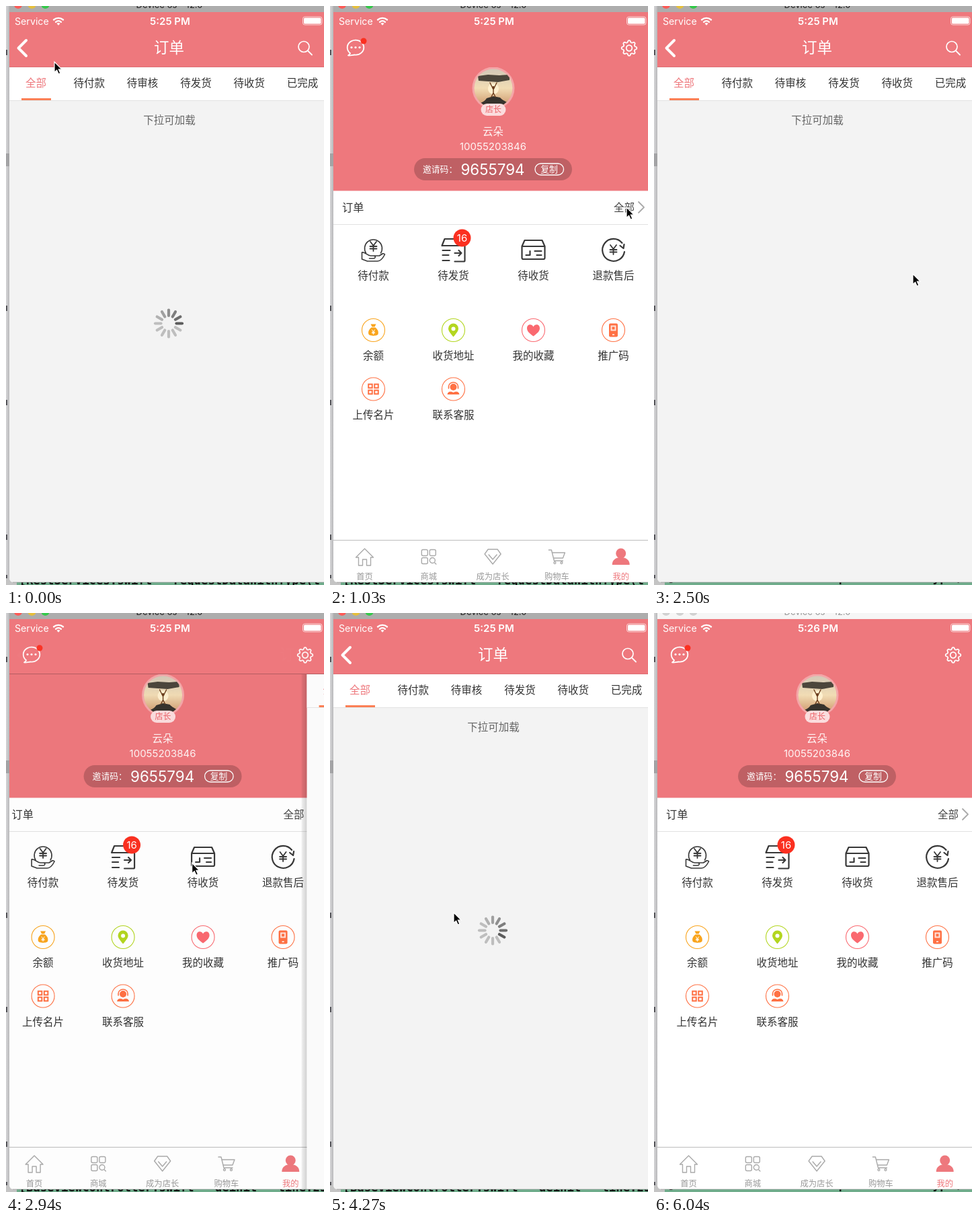
Recreate the animation shown at these times as an HTML page. Size 473 by 860 pixels, loop 6140 ms.

```html
<!DOCTYPE html>
<html lang="zh-CN">
<head>
<meta charset="utf-8">
<title>订单</title>
<style>
html, body { margin: 0; width: 100%; height: 100%; overflow: hidden; background: #d0d0d0; }
svg { display: block; width: 473px; height: 860px; }
text { font-family: Inter, "Noto Sans CJK SC", "Noto Sans CJK", sans-serif; }
.log { font: bold 17.3px "DejaVu Sans Mono", monospace; white-space: pre; }
.line { fill: none; stroke-linecap: round; stroke-linejoin: round; }
</style>
</head>
<body>
<svg id="stage" viewBox="0 0 473 860"></svg>
<script>
const LOOP = 6140, RED = '#ee787d', INK = '#383838', ORANGE = '#ff7144';

// ---------- drawing helpers ----------
const text = (x, mid, size, str, fill = '#333', anchor = 'middle', extra = '') =>
  `<text x="${x}" y="${mid + size * 0.37}" font-size="${size}" fill="${fill}" text-anchor="${anchor}" ${extra}>${str}</text>`;
const rect = (x, y, w, h, fill, extra = '') =>
  `<rect x="${x}" y="${y}" width="${w}" height="${h}" fill="${fill}" ${extra}/>`;
const disc = (x, y, r, fill, extra = '') =>
  `<circle cx="${x}" cy="${y}" r="${r}" fill="${fill}" ${extra}/>`;
const ring = (x, y, r, color, w) => disc(x, y, r, 'none', `stroke="${color}" stroke-width="${w}"`);
const line = (d, color, w) => `<path class="line" d="${d}" stroke="${color}" stroke-width="${w}"/>`;
const shape = (d, fill) => `<path d="${d}" fill="${fill}"/>`;
const at = (x, y, body) => `<g transform="translate(${x} ${y})">${body}</g>`;
const group = (id, body) => `<g id="${id}">${body}</g>`;

const cols = [64.5, 183.5, 302.5, 421.5];
const yen = line('M-4.5 -7L0 -1L4.5 -7M0 -1V7M-5 0H5M-5 3.5H5', INK, 1.8);

// ---------- home icons, centred on 0,0 ----------
const orderIcons = [
  at(0, -5, yen) +
    line('M-11 5A13 13 0 1 1 11 5M-17 4V14L-9 17H6C11 17 15 11 17 7C15 4 12 7 9 9H0M-17 4C-12 3 -9 9 -4 9H1C4 10 3 13 0 13H-6', INK, 1.6),
  line('M-17 -6L-13 -16H12L17 -6V16A1.5 1.5 0 0 1 15.5 17.5H2M-17 -6H17M-16 1H-5M-16 8H-7M-16 16H-6M2 5H12M8 1L12 5L8 9', INK, 2.2),
  line('M-17 -5L-13 -14H13L17 -5V12A2 2 0 0 1 15 14H-15A2 2 0 0 1 -17 12ZM-17 -5H17M-11 8H-5V2M2 2H12M5 8H12', INK, 2.2),
  yen + line('M13 -10A16.5 16.5 0 1 0 16.5 3M16 -8L15 -2L10 -6', INK, 2.2)
];
const squares = (a, s) => [-a, a].map(x => [-a, a].map(y =>
  rect(x - s / 2, y - s / 2, s, s, 'none', `stroke="${ORANGE}" stroke-width="2"`)).join('')).join('');
const toolIcons = [
  ['#f9a41c', '余额', shape('M-4 -9H4L2 -5H-2ZM-3 -4H3C7 -1 8 3 7 6C6 9 -6 9 -7 6C-8 3 -7 -1 -3 -4Z', '#f9a41c') +
    at(0, 3, `<g transform="scale(.5)">${line('M-4 -7L0 -1L4 -7M0 -1V6M-4 0H4M-4 3H4', '#fff', 2)}</g>`)],
  ['#b3d61f', '收货地址', shape('M0 10C-5 4 -7.5 1 -7.5 -2.5A7.5 7.5 0 0 1 7.5 -2.5C7.5 1 5 4 0 10Z', '#b3d61f') + disc(0, -2, 3, '#fff')],
  ['#fa6970', '我的收藏', shape('M0 9C-7 4 -9.5 1 -9.5 -3C-9.5 -9 -2.5 -10 0 -5C2.5 -10 9.5 -9 9.5 -3C9.5 1 7 4 0 9Z', '#fa6970')],
  [ORANGE, '推广码', rect(-6.5, -10, 13, 20, ORANGE, 'rx="2"') + rect(-4, -7, 8, 8, '#ffe3da') +
    rect(-2, -5, 4, 4, ORANGE) + rect(-1.5, 6, 3, 1.5, '#fff')],
  [ORANGE, '上传名片', squares(4.5, 5.5)],
  [ORANGE, '联系客服', disc(0, -3, 5, ORANGE) + shape('M-9 8C-8 3 -4 3 0 5C4 3 8 3 9 8Z', ORANGE) +
    line('M-7 -1V-4A7 6 0 0 1 7 -4V-1', ORANGE, 1.6)]
];
const tabIcons = [
  ['首页', line('M-13 1L0 -12L13 1H9V13H3V4H-3V13H-9V1Z', '#aaa', 1.4)],
  ['商城', [[-6, -6], [6, -6], [-6, 6]].map(([x, y]) =>
    rect(x - 4.5, y - 4.5, 9, 9, 'none', 'rx="2" stroke="#aaa" stroke-width="1.4"')).join('') +
    ring(5.5, 5.5, 4, '#aaa', 1.4) + line('M9 9L11 11', '#aaa', 1.4)],
  ['成为店长', line('M-7 -11H7L12 -4L0 11L-12 -4ZM-6 -3L0 4L6 -3', '#aaa', 1.4)],
  ['购物车', line('M-12 -10H-8L-4 6H9M-7 -6H12L9 2H-5', '#aaa', 1.4) + ring(-3, 9, 1.5, '#aaa', 1.3) + ring(7, 9, 1.5, '#aaa', 1.3)],
  ['我的', disc(0, -5, 7.5, RED) + shape('M-13 12C-13 4 -7 2 -3 1H3C7 2 13 4 13 12Z', RED)]
];

const avatar = disc(243, 122, 31.5, '#f4a6a8') + `<g clip-path="url(#round)">` +
  rect(214, 92, 58, 60, 'url(#dusk)') + disc(243, 123, 8, '#fff0cf') +
  shape('M220 104L235 102L252 103L267 102V110L250 113L221 111Z', '#4c463b') +
  shape('M214 152C222 142 228 145 233 137L243 134L253 136C258 142 264 141 272 152Z', '#37332d') +
  disc(243, 121, 2, '#6b3d1c') + line('M238 114L243 124L248 114M243 124V129L240 135M243 129L246 135', '#6b3d1c', 1.4) + '</g>';

const home = rect(5, 9, 480, 850, '#fff') + rect(5, 9, 480, 265.5, RED) + avatar +
  rect(224.5, 145, 37, 18, '#fbdcdd', 'rx="9"') + text(243, 154, 12, '店长', '#ec6268') +
  text(242.5, 186.5, 15.5, '云朵', '#fff4f4') +
  text(242.5, 208.5, 15, '10055203846', '#fff4f4') +
  rect(125, 226, 235, 33, '#bf6064', 'rx="16.5"') +
  text(138, 242.5, 12.8, '邀请码：', '#fff', 'start') +
  text(242, 243, 22.4, '9655794', '#fff') +
  rect(305, 234, 42.5, 17, 'none', 'rx="8.5" stroke="#fff" stroke-width="1.3"') + text(326, 242.5, 12.8, '复制', '#fff') +
  text(18, 299, 16.2, '订单', '#333', 'start') + text(422, 299, 15.5, '全部', '#444', 'start') +
  line('M459 291L467 299L459 307', '#aaa', 1.8) + rect(5, 324, 480, 1, '#e2e2e2') +
  ['待付款', '待发货', '待收货', '退款售后'].map((s, i) =>
    at(cols[i], 362, orderIcons[i]) + text(cols[i], 400, 15.5, s)).join('') +
  disc(196.5, 344.5, 13, '#fb3020') + text(196.5, 344.5, 15, '16', '#fff') +
  toolIcons.map(([c, s, body], i) => {
    const x = cols[i % 4], y = i < 4 ? 481.5 : 569;
    return ring(x, y, 17, c, 1.1) + at(x, y, body) + text(x, y + 38, 15.5, s);
  }).join('') +
  rect(5, 793, 480, 1, '#bcbcbc') +
  tabIcons.map(([s, body], i) => {
    const x = 51.5 + i * 95.3;
    return at(x, 818, body) + text(x, 847, 12.3, s, i === 4 ? RED : '#999');
  }).join('');

// ---------- order list page ----------
const spokes = Array.from({ length: 12 }, (_, i) =>
  `<line class="spoke" y1="-20" y2="-11.5" stroke-width="4.2" stroke-linecap="round" transform="rotate(${i * 30})"/>`).join('');
const page = rect(-3, 91, 8, 770, 'url(#shade)', 'id="edge"') + rect(5, 91, 480, 770, '#f3f3f3', 'id="paper"') +
  group('pull', text(243, 169.5, 15.5, '下拉可加载', '#666')) +
  rect(5, 91, 480, 49, '#fff', 'id="tabs"') + rect(5, 140, 480, 1, '#e3e3e3') +
  ['全部', '待付款', '待审核', '待发货', '待收货', '已完成'].map((s, i) =>
    text(44.5 + i * 79.3, 114.5, 15.5, s, i ? '#333' : RED)).join('') +
  rect(23, 137, 44, 3, '#fb7f55') +
  `<g id="spin" transform="translate(242 471.5)">${spokes}</g>`;

// ---------- navigation and status bars ----------
const gear = Array.from({ length: 65 }, (_, i) => {
  const a = i / 64 * 2 * Math.PI, r = 10 + 1.3 * Math.tanh(3 * Math.cos(8 * a));
  return (i ? 'L' : 'M') + (r * Math.cos(a)).toFixed(2) + ' ' + (r * Math.sin(a)).toFixed(2);
}).join('') + 'Z';
const homeNav = line('M30 70A12.3 11 0 1 1 36 72.5C33 73 29 74 27 73.5C29 72 30 71 30 70Z', '#fff', 1.8) +
  [32, 38, 44].map(x => disc(x, 61.5, 1.6, '#fff')).join('') + disc(50, 52, 4.5, '#fb3020') +
  at(445, 62.5, line(gear, '#fff', 1.7) + ring(0, 0, 4.3, '#fff', 1.7));
const pageNav = line('M30 51L18.5 62.5L30 74', '#fff', 4) +
  group('head', text(242.5, 62, 22.5, '订单', '#fff')) +
  ring(443, 60.5, 8, '#fff', 1.7) + line('M449 66.5L455 72.5', '#fff', 1.8);
const status = text(13, 22.5, 14.2, 'Service', '#fff', 'start') +
  line('M71 20.5A10.5 10.5 0 0 1 85 20.5M74 23.8A6 6 0 0 1 82 23.8', '#fff', 2.4) + shape('M75.5 26A4 4 0 0 1 80.5 26L78 28.8Z', '#fff') +
  text(244, 22.5, 15, '5:25 PM', '#fff', 'middle', 'id="clock" font-weight="600"') +
  rect(441.5, 16, 28.5, 12, 'none', 'rx="3" stroke="#fbd5d6" stroke-width="1"') + rect(443, 17.5, 25.5, 9, '#fff', 'rx="1.5"');

const stops = list => list.map(([o, c, a = 1]) => `<stop offset="${o}" stop-color="${c}" stop-opacity="${a}"/>`).join('');
document.getElementById('stage').innerHTML = `<defs>
  <linearGradient id="side">${stops([[0, '#d6d6d8'], [1, '#b3b3b5']])}</linearGradient>
  <linearGradient id="shade">${stops([[0, '#000', 0.05], [1, '#000', 0.18]])}</linearGradient>
  <linearGradient id="dusk" x2="0" y2="1">${stops([[0, '#d2c8b8'], [0.5, '#f1dcb4'], [1, '#c98f62']])}</linearGradient>
  <clipPath id="round"><circle cx="243" cy="122" r="28.5"/></clipPath>
  <clipPath id="win"><rect x="5" y="-20" width="490" height="876" rx="6"/></clipPath></defs>` +
  rect(0, 0, 6, 860, 'url(#side)') + rect(0, 219, 5, 19, '#a3a3a5') +
  [65, 445, 585, 785, 845].map(y => rect(0, y, 2, 8, '#55555a')).join('') +
  rect(0, 850, 473, 10, '#c4c4c4') + rect(16, 850, 457, 10, '#70ad8c') +
  '<text id="log" class="log" x="19.5" fill="#111"></text>' +
  `<g clip-path="url(#win)">` +
  rect(5, 0, 480, 10, '#adadad', 'id="bar"') +
  [['#fc5b57', 18], ['#e5bf3c', 38.5], ['#34c84a', 58.5]].map(([c, x]) => disc(x, -2, 6, c, 'class="lamp"')).join('') +
  text(243, -1.5, 13, 'Device 6s - 12.0', '#333', 'middle', 'id="title"') +
  group('home', home) + rect(5, 91, 480, 770, '#000', 'id="dim"') + group('page', page) +
  rect(5, 9, 480, 82, RED) + rect(5, 90, 480, 1, '#a8565a', 'id="rule"') +
  group('homeNav', homeNav) + group('pageNav', pageNav) + status + '</g>' +
  rect(10, 855.5, 463, 1, '#8a8a8a', 'opacity=".6"') +
  `<g id="mouse"><path d="M0 0V15.5L3.6 12.2L6.2 18L8.8 16.8L6.3 11.2H11Z" fill="#000" stroke="#fff" stroke-width="1.2"/></g>`;

// ---------- timing ----------
const $ = id => document.getElementById(id);
const lamps = [...document.querySelectorAll('.lamp')];
const lampColors = lamps.map(l => l.getAttribute('fill'));
const spokeEls = [...document.querySelectorAll('.spoke')];

// The picture advances in evenly spaced updates: start, end, count.
const bursts = [[150, 1180, 8], [1330, 2350, 8], [2500, 3240, 6], [3540, 4570, 8], [4860, 5460, 5], [5760, 6040, 3]];
function hold(t) {
  let shown = 0;
  for (const [a, b, n] of bursts)
    for (let i = 0; i < n; i++) {
      const s = Math.floor((a + (b - a) * i / (n - 1)) / 10 + 1e-6) * 10;
      if (s <= t) shown = s;
    }
  return shown;
}

// Page changes: a tap brings the order page in (1), a swipe to the right sends it away (0).
const moves = [[350, 0], [1250, 1], [1452, 0], [1950, 1], [2720, 0], [3400, 1], [3510.5, 0], [3950, 1], [4300, 0]];
function progress(t) {
  let p = 1;
  for (const [start, to] of moves) if (t >= start) {
    const x = (t - start) * 0.02, s = x > 5 ? 1 : 1 - (1 + x) * Math.exp(-x);
    p = to ? s : 1 - s;
  }
  return p;
}

// Pointer: to the row link for each tap, then to the left edge for each swipe.
const path = [[0, 72, 83], [150, 35, 66], [300, 24, 62], [440, 24, 62], [1030, 441, 299], [1180, 445, 299],
  [1330, 400, 320], [1480, 60, 386], [1620, 187, 386], [1920, 441, 299], [2350, 441, 299], [2500, 385, 398],
  [2650, 20, 410], [2800, 200, 405], [3240, 441, 299], [3390, 441, 299], [3540, 60, 415], [3680, 126, 417],
  [3980, 441, 299], [4120, 441, 299], [4270, 184, 445], [4420, 190, 440], [4570, 260, 430], [4720, 260, 430],
  [5460, 320, 99], [5760, 340, 12], [6140, 340, -40]];
function pointer(t) {
  const i = Math.max(1, path.findIndex(k => k[0] >= t));
  const [t0, x0, y0] = path[i - 1], [t1, x1, y1] = path[i], u = (t - t0) / (t1 - t0);
  return [x0 + (x1 - x0) * u, y0 + (y1 - y0) * u];
}

const set = (id, name, v) => $(id).setAttribute(name, v);
const show = (id, on) => set(id, 'opacity', on ? 1 : 0);

function draw(now) {
  const t = hold(now % LOOP), p = progress(t), idle = t >= 5900;
  const moving = p > 0 && p < 1;
  set('home', 'transform', `translate(${-142 * p} 0)`);
  set('page', 'transform', `translate(${474 * (1 - p)} 0)`);
  set('dim', 'opacity', 0.13 * p);
  show('page', p > 0);
  show('edge', moving);
  set('rule', 'opacity', moving ? 0.8 : p * 0.25);
  set('paper', 'fill', moving ? '#fafafa' : '#f3f3f3');
  set('tabs', 'fill', moving ? '#fbfbfb' : '#fff');
  show('pull', !moving);

  set('homeNav', 'opacity', 1 - p);
  set('pageNav', 'opacity', Math.pow(p, 1.5));
  set('head', 'transform', `translate(${200 * (1 - p)} 0)`);

  const loaded = t >= 2500 && t < 3000;
  show('spin', p === 1 && !loaded);
  const lead = t < 1200 ? 3 + Math.floor(t / 83.3) : 4 + Math.floor((t - 4270) / 83.3);
  spokeEls.forEach((el, i) => {
    const age = ((lead - i) % 12 + 12) % 12;
    const v = Math.min(190, 92 + age * 17);
    el.setAttribute('stroke', `rgb(${v},${v},${v})`);
  });

  const leaving = t >= 2940 && t < 5010;
  $('log').textContent = leaving ? '[BaseViewController.swift - deinit - line:25'
    : '[RestServices.swift - requestDataWithType(t';
  set('log', 'y', t < 2350 || leaving ? 859 : 855);

  $('clock').textContent = idle ? '5:26 PM' : '5:25 PM';
  set('bar', 'fill', idle ? '#f6f6f6' : '#adadad');
  set('title', 'fill', idle ? '#999' : '#222');
  lamps.forEach((l, i) => l.setAttribute('fill', idle ? '#d2d2d2' : lampColors[i]));

  const [x, y] = pointer(t);
  set('mouse', 'transform', `translate(${x} ${y})`);
  show('mouse', !idle);
}

const begin = performance.now();
function tick() {
  draw(performance.now() - begin);
  requestAnimationFrame(tick);
}
tick();
</script>
</body>
</html>
```
